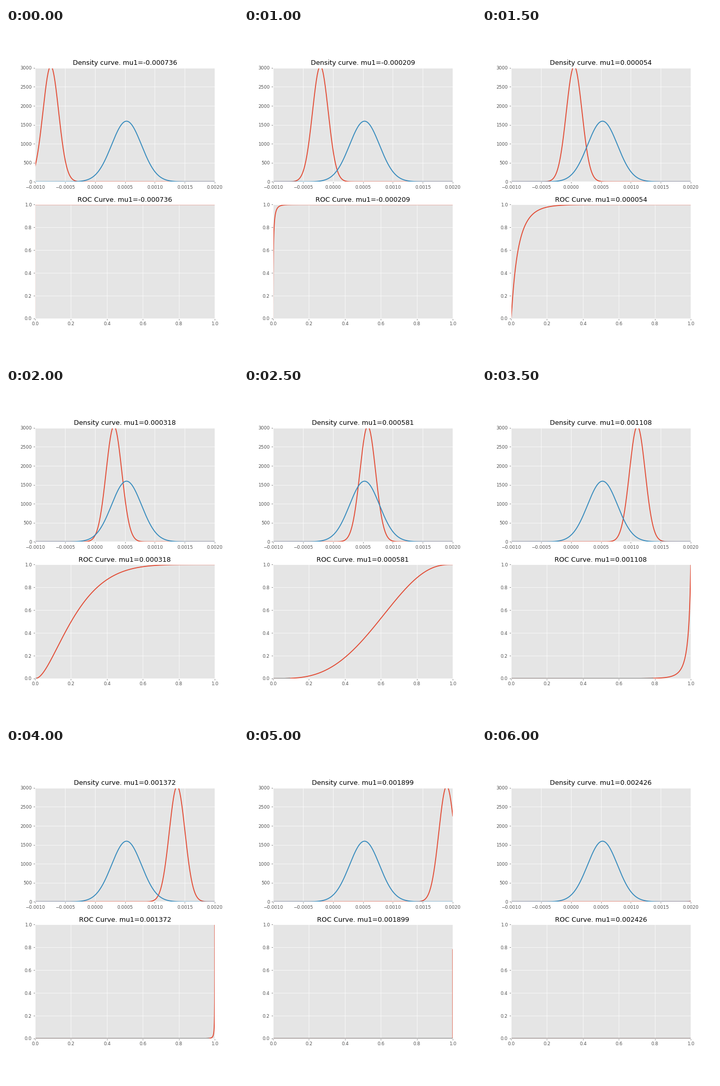
A matplotlib script for the animation above (6.5 s loop, 448 px wide and 640 px high).

```python
import math

import numpy as np
import matplotlib.pyplot as plt
from matplotlib.animation import FuncAnimation

FRAMES, INTERVAL = 13, 500
START, STEP = -0.001, 0.00026353
SIGMA1 = 0.000131
MU2, SIGMA2 = 0.000527, 0.00025
RED, BLUE, GREY = "#E24A33", "#348ABD", "#777777"

plt.style.use("ggplot")
plt.rcParams["font.family"] = "DejaVu Sans"

x = np.linspace(-0.001, 0.002, 1000)
erf = np.vectorize(math.erf)


def pdf(mu, sigma):
    z = (x - mu) / sigma
    return np.exp(-z * z / 2) / (sigma * math.sqrt(2 * math.pi))


def cdf(mu, sigma):
    return (1 + erf((x - mu) / (sigma * math.sqrt(2)))) / 2


fig, (density, roc) = plt.subplots(2, 1, figsize=(7, 10), dpi=64)
fig.subplots_adjust(left=0.125, right=0.9, bottom=0.125, top=0.88, hspace=0.2)

ticks = np.arange(-2, 5) * 0.0005
density.set_xticks(ticks, [f"{t:.4f}".replace("-", "\u2212") for t in ticks])
density.set(xlim=(-0.001, 0.002), ylim=(0, 3000))
density.set_yticks(range(0, 3001, 500))
roc.set(xlim=(0, 1), ylim=(0, 1))
roc.set_xticks(np.linspace(0, 1, 6))
roc.set_yticks(np.linspace(0, 1, 6))

moving, = density.plot([], [], color=RED, lw=2)
density.plot(x, pdf(MU2, SIGMA2), color=BLUE, lw=2)
curve, = roc.plot([], [], color=RED, lw=2)
floor, = roc.plot([], [], color=GREY, lw=2, solid_capstyle="butt")

base = cdf(MU2, SIGMA2)


def draw(i):
    mu = START + (i + 1) * STEP
    density.set_title(f"Density curve. mu1={mu:.6f}")
    roc.set_title(f"ROC Curve. mu1={mu:.6f}")
    moving.set_data(x, pdf(mu, SIGMA1))
    rate = cdf(mu, SIGMA1)
    curve.set_data(base, rate)
    # the stretch resting on the axis is grey
    flat = rate < 0.002
    floor.set_data(base[flat], rate[flat])
    return moving, curve, floor


anim = FuncAnimation(fig, draw, frames=FRAMES, interval=INTERVAL,
                     init_func=lambda: draw(0), repeat=True, repeat_delay=0)
plt.show()
```
